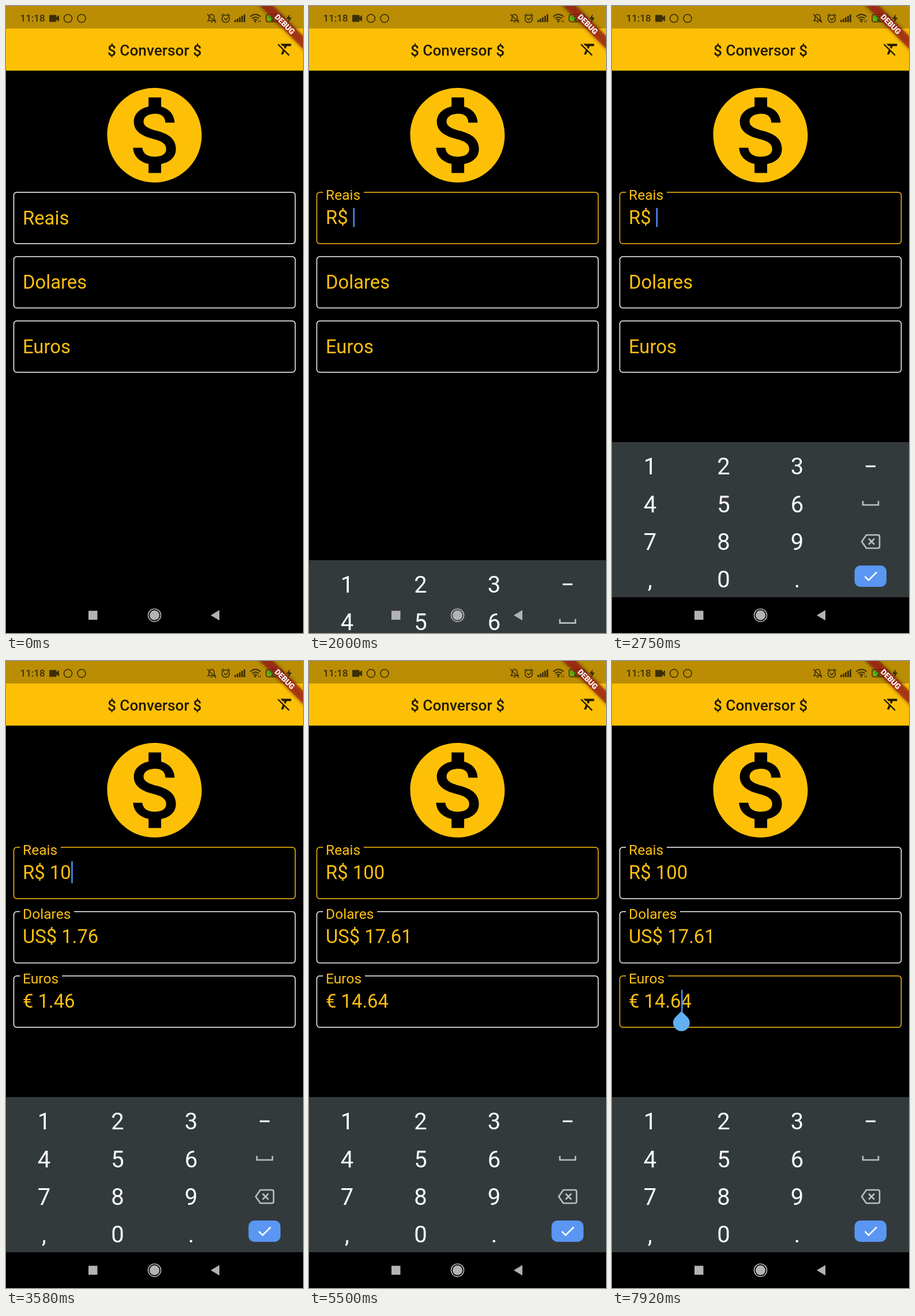
Animation, 515 px wide and 1087 px high, one loop 8000 ms. Source, as an HTML page:

```html
<!DOCTYPE html>
<html lang="pt">
<head>
<meta charset="utf-8">
<title>Conversor</title>
<style>
html, body { margin: 0; width: 100%; height: 100%; overflow: hidden; background: #000; }
svg { display: block; width: 515px; height: 1087px; font-family: Roboto, sans-serif; }
text { white-space: pre; }
.line { fill: none; stroke-width: 1.6; }
</style>
</head>
<body>
<svg viewBox="0 0 515 1087">
  <rect width="515" height="1087"/>
  <rect width="515" height="112" fill="#fec007"/>
  <rect width="515" height="39" fill="#ba8d04"/>

  <g id="status" fill="#3c2f06" stroke="#3c2f06" stroke-width="0">
    <text x="24.5" y="27.3" font-size="17" font-weight="500">11:18</text>
    <path d="M76 15.500h10.500q1 0 1 1v3l4.500-3.500v11l-4.500-3.500v3q0 1-1 1h-10.500q-1 0-1-1v-10q0-1 1-1z"/>
    <circle class="line" cx="107.500" cy="21.500" r="7"/>
    <circle class="line" cx="131" cy="21.500" r="7"/>
    <path class="line" d="M350 25.500h13l-2-2.500v-4q-1-4.500-4.500-4.500t-4.500 4.500v4zM355 28h3M349 14l15 15"/>
    <circle class="line" cx="381" cy="22" r="6.500"/>
    <path class="line" d="M373.500 17l4-3.500M388.500 17l-4-3.500M378 21l3 3 4-4"/>
    <path d="M396 24h2.800v4h-2.800zM400 22h2.800v6h-2.800zM404 19.500h2.800v8.500h-2.800zM408 17h2.800v11h-2.800zM412 14.500h2.800v13.500h-2.800z"/>
    <path class="line" style="stroke-width:2" d="M423.500 18.500q9-8 18 0M426.500 21.800q6-5 12 0M429.300 24.500q3.200-2.500 6 0"/>
    <circle cx="432.300" cy="26.800" r="1.700"/>
    <path class="line" style="stroke-width:1" d="M438 24.500v4M441 24.500v4"/>
    <rect class="line" x="451" y="14.500" width="28" height="13" rx="3.500"/>
    <rect x="453" y="16.500" width="10" height="9" rx="1.500" fill="#55b80c"/>
    <rect x="480.500" y="18.500" width="2" height="5"/>
    <text x="459" y="25.500" font-size="12" font-weight="700">26</text>
    <path d="M492 14l-6 8.500h4l-1 6.500 6.500-9h-4z"/>
  </g>

  <g fill="#000" fill-opacity=".87">
    <text x="257.500" y="85.500" font-size="26.2" font-weight="500" text-anchor="middle">$ Conversor $</text>
    <path transform="translate(468.200 59) scale(1.311)" d="M3.270 5L2 6.270l6.970 6.970L6.500 19h3l1.570-3.660L16.730 21 18 19.730 3.550 5.270zM6 5v.18L8.820 8h2.400l-.72 1.680 2.100 2.100L14.210 8H20V5z"/>
  </g>

  <g transform="translate(515 0) rotate(45)">
    <rect x="-60" y="36.700" width="120" height="15.700" opacity=".5" style="filter:blur(3px)"/>
    <rect x="-60" y="36.700" width="120" height="15.700" fill="#b71c1c" fill-opacity=".63"/>
    <text y="49.300" font-size="13.400" font-weight="900" fill="#fff" text-anchor="middle">DEBUG</text>
  </g>

  <path fill="#fec007" transform="translate(159.150 125.650) scale(8.195)" d="M12 2C6.480 2 2 6.480 2 12s4.480 10 10 10 10-4.480 10-10S17.520 2 12 2zm1.410 16.090V20h-2.670v-1.930c-1.710-.36-3.160-1.460-3.270-3.400h1.960c.1 1.050.82 1.870 2.650 1.870 1.960 0 2.400-.98 2.400-1.590 0-.83-.44-1.610-2.670-2.140-2.480-.6-4.180-1.620-4.180-3.670 0-1.720 1.390-2.840 3.110-3.210V4h2.670v1.950c1.860.45 2.790 1.860 2.850 3.390H14.300c-.05-1.110-.64-1.870-2.220-1.870-1.500 0-2.400.68-2.400 1.640 0 .84.65 1.390 2.670 1.910s4.180 1.390 4.180 3.910c-.01 1.830-1.380 2.830-3.120 3.160z"/>

  <g id="fields" fill="#fdc010"></g>
  <rect id="cursor" width="2.600" fill="#4a8cf5"/>
  <path id="handle" fill="#62b0f4" transform="translate(120.400 627.400) rotate(45)" d="M0-14.400A14.400 14.400 0 1 1-14.400 0V-14.400Z"/>

  <g id="keyboard">
    <rect y="756" width="515" height="269" fill="#333a3c"/>
    <rect y="1025" width="515" height="62"/>
    <g id="keys" fill="#fff" font-size="40" text-anchor="middle"></g>
    <path d="M440 798h17" stroke="#fff" stroke-width="3"/>
    <g fill="none" stroke="#bcbfc0" stroke-width="2.600">
      <path d="M435 858v7h27v-7"/>
      <path stroke-linejoin="round" d="M441 917h20q3 0 3 3v17q0 3-3 3h-20l-8-11.500zM445 923.500l10 10M455 923.500l-10 10"/>
    </g>
    <rect x="420.500" y="970" width="55.500" height="37" rx="10" fill="#5a96f2"/>
    <path d="M438.500 989l6.500 6.500 14-14" fill="none" stroke="#fff" stroke-width="2.600"/>
  </g>

  <g fill="#b3b3b3">
    <rect x="143" y="1048.500" width="15.500" height="15.500"/>
    <circle cx="257.500" cy="1056.200" r="8.500"/>
    <circle class="line" cx="257.500" cy="1056.200" r="11" stroke="#b3b3b3"/>
    <path d="M355 1056.200l15-9v18z"/>
  </g>
</svg>
<script>
const LOOP = 8000;
const FOCUS = 1750, REFOCUS = 6750;
const TYPED = [3330, 3580, 3920];
const BLINKS = [FOCUS, ...TYPED, 6810];
const GAP = 24.3;

const $ = id => document.getElementById(id);
const clamp = v => Math.min(1, Math.max(0, v));

function add(parent, tag, attrs, text = "") {
  const node = document.createElementNS("http://www.w3.org/2000/svg", tag);
  set(node, attrs);
  node.textContent = text;
  parent.append(node);
  return node;
}
function set(node, attrs) {
  for (const key in attrs) node.setAttribute(key, attrs[key]);
}

// cubic-bezier(.4, 0, .2, 1)
function ease(p) {
  let lo = 0, hi = 1;
  for (let i = 0; i < 20; i++) {
    const s = (lo + hi) / 2, r = 1 - s;
    if (1.2 * r * r * s + 0.6 * r * s * s + s ** 3 < p) lo = s; else hi = s;
  }
  return 3 * (1 - lo) * lo * lo + lo ** 3;
}
const tween = (t, start, length) => ease(clamp((t - start) / length));

const fields = [
  { name: "Reais", prefix: "R$ ", gapEnd: 95, floatAt: FOCUS },
  { name: "Dolares", prefix: "US$ ", gapEnd: 118, floatAt: TYPED[0], rate: 0.1761 },
  { name: "Euros", prefix: "€ ", gapEnd: 97, floatAt: TYPED[0], rate: 0.1464 }
];
fields.forEach((f, i) => {
  f.y = 323 + i * 111.5;
  f.border = add($("fields"), "path", { fill: "none", "stroke-width": 1.5 });
  f.label = add($("fields"), "text", {}, f.name);
  f.value = add($("fields"), "text", { x: 29, y: f.y + 54.7, "font-size": 32.8 });
});

["123", "456", "789", ",0."].forEach((row, r) =>
  [...row].forEach((key, c) =>
    add($("keys"), "text", { x: 66 + c * 127.5, y: 812.3 + r * 65.2 }, key)));

function drawField(f, t, typed, focus) {
  const up = tween(t, f.floatAt, 170);
  const amount = f.rate ? (typed * f.rate).toFixed(2) : typed;
  set(f.border, {
    d: `M${GAP + (f.gapEnd - GAP) * up} ${f.y}H496.5a5 5 0 0 1 5 5v79a5 5 0 0 1-5 5H18.5a5 5 0 0 1-5-5v-79a5 5 0 0 1 5-5H${GAP}`,
    stroke: `rgb(255,${255 - 65 * focus},${255 - 235 * focus})`
  });
  set(f.label, { x: 29, y: f.y + 55.7 - 43.2 * up, "font-size": 32.8 - 8.2 * up });
  f.value.textContent = f.prefix + (typed ? amount : "");
  set(f.value, { opacity: up });
}

function draw(t) {
  const digits = TYPED.filter(at => t >= at).length;
  const typed = "100".slice(0, digits);
  const moved = tween(t, REFOCUS, 150);
  const focus = [tween(t, FOCUS, 150) * (1 - moved), 0, moved];
  fields.forEach((f, i) => drawField(f, t, typed, focus[i]));

  const since = t - BLINKS.filter(at => t >= at).pop();
  const inEuros = t >= REFOCUS;
  set($("cursor"), {
    x: inEuros ? 120 : 76.5 + 18.35 * digits,
    y: inEuros ? 570 : digits ? 347 : 350,
    height: digits ? 38 : 33,
    opacity: since >= 0 && Math.floor(since / 500) % 2 === 0 ? 1 : 0
  });
  set($("handle"), { opacity: clamp((t - 6810) / 150) });
  set($("keyboard"), { transform: `translate(0 ${331 * (1 - tween(t, 1914, 285))})` });
}

function tick(now) {
  draw(now % LOOP);
  requestAnimationFrame(tick);
}
draw(0);
requestAnimationFrame(tick);
</script>
</body>
</html>
```
